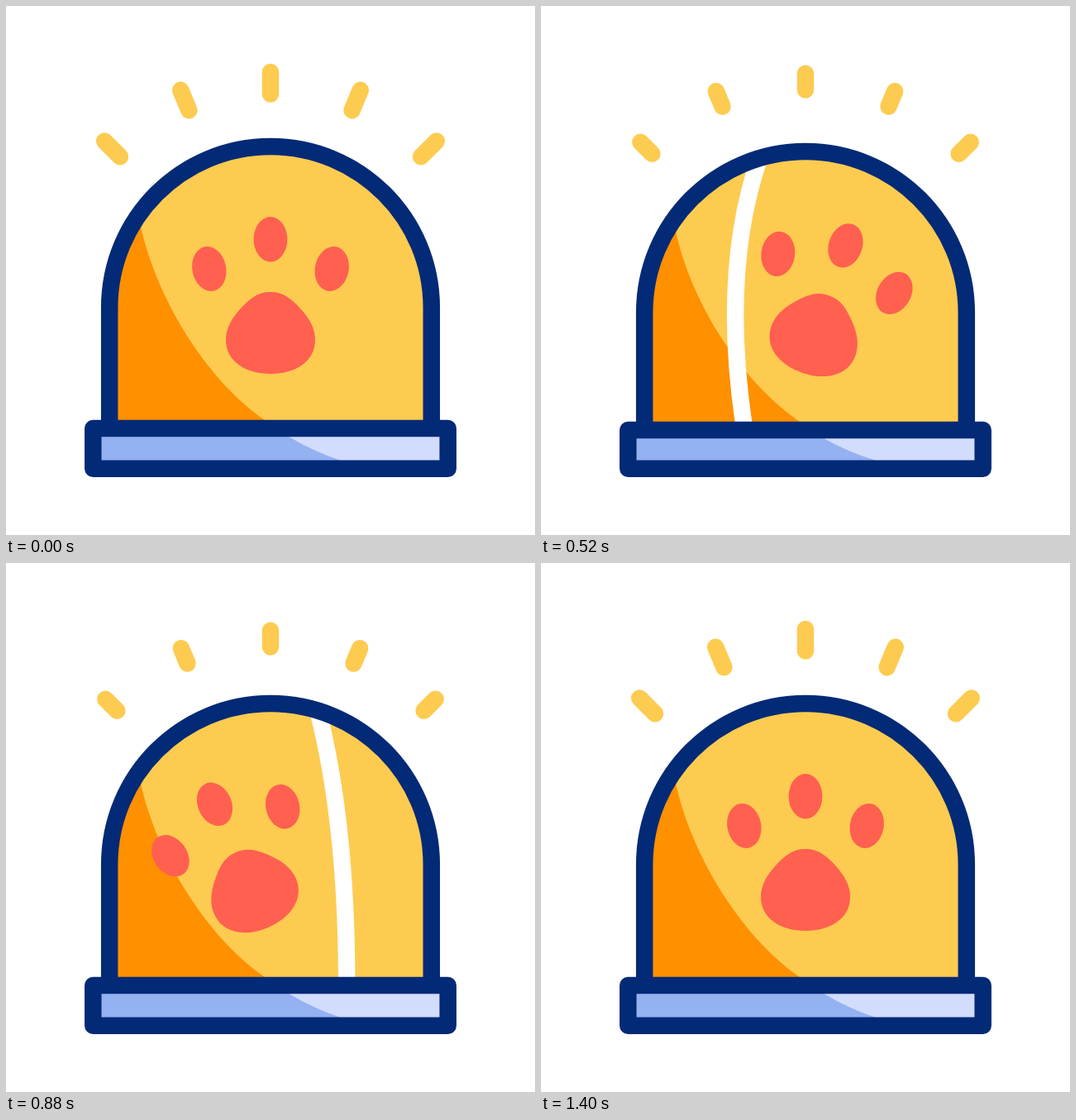
Write an HTML page with a canvas that moves like this. It is 640 px wide and 640 px high and loops after 1480 ms.

```html
<!DOCTYPE html>
<html lang="en">
<head>
<meta charset="utf-8">
<title>Paw siren</title>
<style>
  html, body { margin: 0; height: 100%; overflow: hidden; background: #fff; }
  canvas { display: block; }
</style>
</head>
<body>
<canvas id="stage" width="640" height="640"></canvas>
<script>
const ctx = document.getElementById('stage').getContext('2d');
const LOOP = 1480, STEP = 40, ACTIVE = 1400, LINE = 20.5;
const NAVY = '#032a76', YELLOW = '#fdcb50', ORANGE = '#ff9000', CORAL = '#ff6050',
      BLUE = '#94b1f2', PALE = '#d2dcfc', WHITE = '#fff';
const { PI, sin, cos, min, max, abs, floor } = Math;

const ramp = (t, from, to) => min(1, max(0, (t - from) / (to - from)));
const smooth = p => (1 - cos(PI * p)) / 2;

const PAD = new Path2D(`M320 346C336 346 345 354 357 367C367 378 374 390 374 404
  C374 430 350 445 320 445S266 430 266 404C266 390 273 378 283 367C295 354 304 346 320 346Z`);

function fill(path, color) {
  ctx.fillStyle = color;
  ctx.fill(path);
}

function stroke(path, color) {
  ctx.strokeStyle = color;
  ctx.lineWidth = LINE;
  ctx.stroke(path);
}

// The siren squashes, stretches and squashes again, then rests.
function bounce(t) {
  const wave = t < 720 ? -sin(2 * PI * t / 480) : 0;
  const up = max(0, wave), sag = max(0, -wave);
  return {
    sag,
    top: 170 - 8.5 * up + 12 * sag,
    side: 365 + 31 * up + 12 * sag,
    rise: 107.7 + 38 * up,
    crown: 107.7 + 16 * up,
    base: 511 - 10.5 * up + 4 * sag
  };
}

// Each flash runs outwards; the last one stays lit.
function drawRays(t) {
  const cycle = min(3, floor((t + 40) / 360));
  const c = t + 40 - 360 * cycle;
  const head = cycle ? smooth(ramp(c, -10, 240)) : 1;
  const tail = cycle < 3 ? smooth(ramp(c, 135, 360)) : 0;
  if (head - tail < .01) return;
  const radius = p => 256.5 + 26.5 * p;
  ctx.lineCap = 'round';
  for (let i = -2; i <= 2; i++) {
    const angle = i * 22.6 * PI / 180;
    const at = p => `${320 + sin(angle) * radius(p)} ${363 - cos(angle) * radius(p)}`;
    stroke(new Path2D(`M${at(head)}L${at(tail)}`), YELLOW);
  }
  ctx.lineCap = 'butt';
}

// The paw tilts right, sweeps left and returns, shrinking a little on each beat.
function drawPaw(t, sag) {
  const sweep = ramp(t, 460, 920), bump = sin(PI * sweep) ** 2;
  const angle = 20.5 * ramp(t, 0, 460) - 45 * smooth(sweep) + 24.5 * ramp(t, 920, ACTIVE);
  const size = 1 - .03 * cos(PI * t / 360) ** 2 * sin(PI * min(1, t / ACTIVE));
  ctx.save();
  ctx.translate(320 + min(0, angle) / 6 - 10 * bump, 439 - abs(angle) / 6 + 4 * sag + 2 * bump);
  ctx.rotate(angle * PI / 180);
  ctx.scale(size, size);
  ctx.translate(-320, -439);
  fill(PAD, CORAL);
  for (const side of [-1, 0, 1]) {
    const toe = new Path2D();
    toe.ellipse(320 + 74.2 * side, side ? 318 : 282.3, 20.4, 27.2, .2 * side, 0, 2 * PI);
    fill(toe, CORAL);
  }
  ctx.restore();
}

// A band of light crosses the glass, bowed towards the nearer edge.
function drawStripe(t, base) {
  if (t < 200 || t > 1160) return;
  const u = (t - 700) / 340;
  const curve = (a, b, c) => a + b * u + c * u * u;
  const x = curve(318, 106, 13), bend = curve(310, 183, 17), foot = curve(326, 158, 9);
  const y = 180, mid = 315, end = base - 10;
  stroke(new Path2D(`M${x - (bend - x) * .4} ${y - (mid - y) * .4}L${x} ${y}
    Q${bend} ${mid} ${foot} ${end}l${(foot - bend) * .1} ${(end - mid) * .1}`), WHITE);
}

function drawDome(t, { top, side, rise, crown, base, sag }) {
  const dome = new Path2D(`M125.2 ${base}V${side}
    C125.2 ${side - rise} ${320 - crown} ${top} 320 ${top}
    S514.8 ${side - rise} 514.8 ${side}V${base}`);
  const high = top - 170, low = base - 511;
  ctx.save();
  ctx.clip(dome);
  fill(dome, YELLOW);
  fill(new Path2D(`M100 224H154L163 ${267 + high}C182 ${352 + high} 240 ${450 + low} 313 ${501 + low}
    L330 ${base + 2}H100Z`), ORANGE);
  drawPaw(t, sag);
  drawStripe(t, base);
  ctx.restore();
  stroke(dome, NAVY);
}

function drawBase(top) {
  const bottom = 559.8, inner = top + 10, floorY = 549.6;
  const box = new Path2D(`M105.3 ${top}H534.7V${bottom}H105.3Z`);
  fill(box, PALE);
  fill(new Path2D(`M105 ${top}H328L342 ${inner}Q373 ${(inner + floorY) / 2 + 4} 404 ${floorY}
    L420 ${bottom}H105Z`), BLUE);
  stroke(box, NAVY);
}

function draw(t) {
  ctx.fillStyle = WHITE;
  ctx.fillRect(0, 0, 640, 640);
  const pose = bounce(t);
  drawRays(t);
  drawDome(t, pose);
  drawBase(pose.base);
}

ctx.lineJoin = 'round';
const began = performance.now();
function tick() {
  const t = (performance.now() - began) % LOOP;
  draw(floor(t / STEP) * STEP);
  requestAnimationFrame(tick);
}
tick();
</script>
</body>
</html>
```
